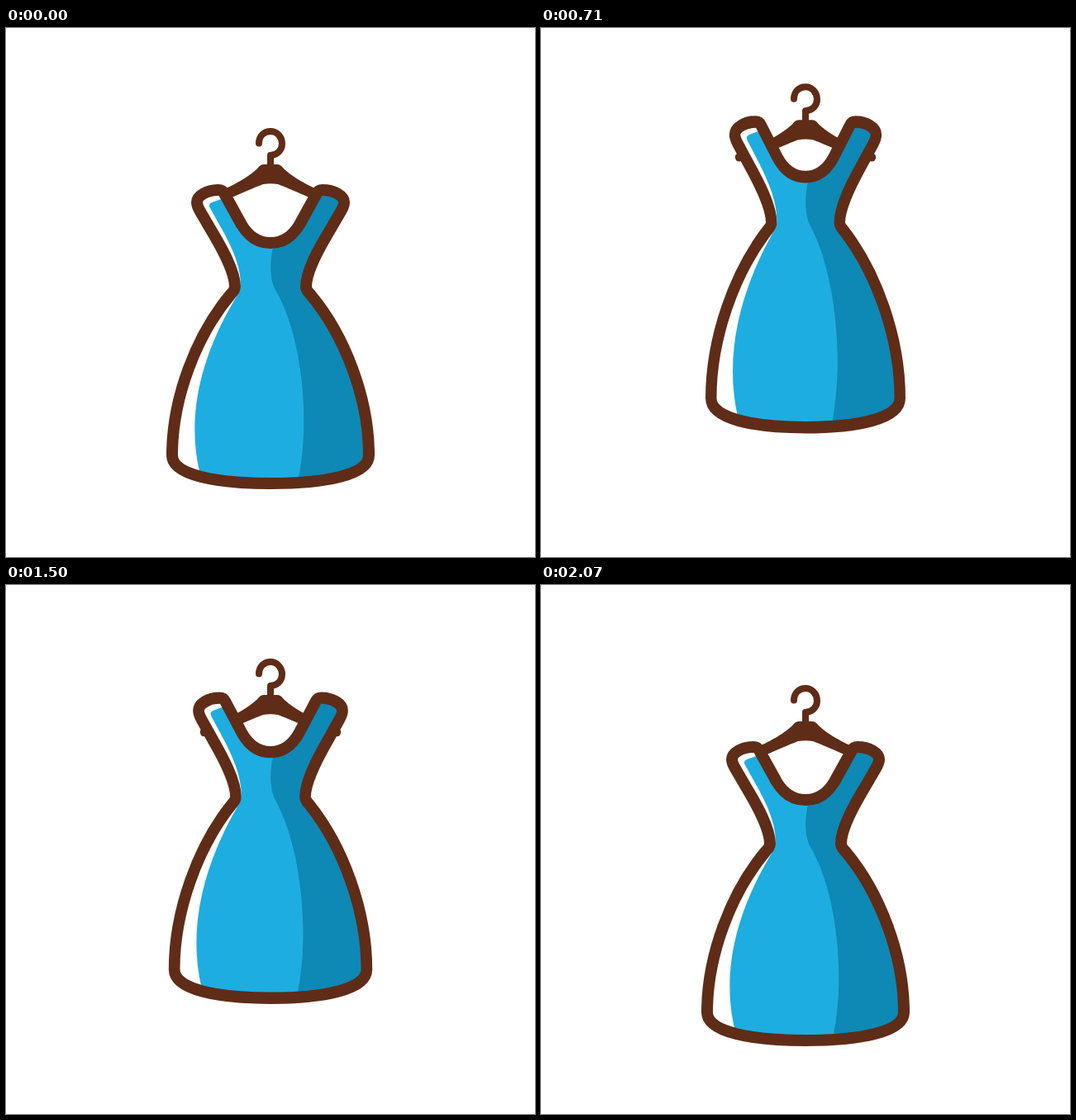
Recreate the animation shown at these times as an HTML page. Size 640x640 px, loop 3640 ms.

```html
<!DOCTYPE html>
<html lang="en">
<head>
<meta charset="utf-8">
<title>Jumping dress</title>
<style>
  html, body { margin: 0; width: 100%; height: 100%; overflow: hidden; background: #fff; }
  svg { display: block; width: 100%; height: 100%; }
</style>
</head>
<body>
<svg viewBox="0 0 640 640">
  <defs>
    <path id="outline" d="M264 200 Q262 196 257 196 C243 196 231 203 231 211 Q231 215 235 222
      L249 246 C261 266 277 294 277 313 Q277 317 272 322 C230 372 201 448 201 517
      C201 541 255 551 320 551 C385 551 439 541 439 517 C439 448 410 372 368 322
      Q363 317 363 313 C363 294 379 266 391 246 L405 222 Q409 215 409 211
      C409 203 397 196 383 196 Q378 196 376 200 L355 238
      C346 253 335 260 320 260 C305 260 294 253 285 238 Z"/>
    <clipPath id="body"><use href="#outline"/></clipPath>
  </defs>
  <g id="hanger">
    <path d="M306 139.5 C306 131 312 125 320 125 C328 125 334 132 334 140 C334 148 328 153.5 320 154 V170"
      fill="none" stroke="#5f2c17" stroke-width="8" stroke-linecap="round" stroke-linejoin="round"/>
    <path fill="#5f2c17" d="M312 165 H328 Q332 165 335 169 C344 179 366 191 383 198 L402 205.5
      A5 5 0 0 1 399 215 L374 208 C355 200 340 193 329 189 Q320 187.5 311 189
      C300 193 285 200 266 208 L241 215 A5 5 0 0 1 238 205.5 L257 198
      C274 191 296 179 305 169 Q308 165 312 165 Z"/>
  </g>
  <g id="dress">
    <use href="#outline" fill="#fff"/>
    <g clip-path="url(#body)">
      <path fill="#1eade0" d="M266 205 L249 211 Q244 213 247 218 L261 243 C275 268 284 290 284 312
        Q284 318 277 328 C240 390 216 465 235 540 L240 560 H450 V190 H300 Z"/>
      <path fill="#0e88b5" d="M325 258 C320 275 317 300 326 317 C356 367 370 470 353 548
        L350 560 H450 V190 H360 Z"/>
    </g>
    <use href="#outline" fill="none" stroke="#5f2c17" stroke-width="14" stroke-linejoin="round"/>
  </g>
</svg>
<script>
const LOOP = 3640, FPS = 14, APEX = 13.5, END = 29, CENTER_Y = 373.5;

const mix = (a, b, u) => a + (b - a) * u;
const smooth = u => u * u * (3 - 2 * u);
const easeOut = u => 1 - (1 - u) ** 2.2;

// Each motion crouches from rest to low, jumps to high, lands on low and settles.
// rise and fall are the powers that shape the jump on either side of its apex.
const hangerY = { rest: 0, low: 20, high: -56, crouchAt: 3, landAt: 24.5, rise: 3.2, fall: 3, settle: smooth };
const dressY = { rest: 0, low: 21, high: -81, crouchAt: 3, landAt: 24.5, rise: 2.6, fall: 3.6, settle: smooth };
const dressWidth = { rest: 1, low: 1.103, high: 0.949, crouchAt: 2, landAt: 24, rise: 2.2, fall: 5, settle: easeOut };

function bounce(step, { rest, low, high, crouchAt, landAt, rise, fall, settle }) {
  if (step < crouchAt) return mix(rest, low, smooth(step / crouchAt));
  if (step < APEX) return mix(high, low, ((APEX - step) / (APEX - crouchAt)) ** rise);
  if (step < landAt) return mix(high, low, ((step - APEX) / (landAt - APEX)) ** fall);
  return mix(low, rest, settle((step - landAt) / (END - landAt)));
}

const hanger = document.getElementById('hanger');
const dress = document.getElementById('dress');

function draw(now) {
  const step = Math.min(END, Math.floor((now % LOOP + 5) * FPS / 1000));
  const width = bounce(step, dressWidth);
  const y = CENTER_Y + bounce(step, dressY);
  hanger.setAttribute('transform', `translate(0 ${bounce(step, hangerY)})`);
  dress.setAttribute('transform',
    `translate(320 ${y}) scale(${width} ${1 / width}) translate(-320 ${-CENTER_Y})`);
}

const start = performance.now();
function tick() {
  draw(performance.now() - start);
  requestAnimationFrame(tick);
}
tick();
</script>
</body>
</html>
```
